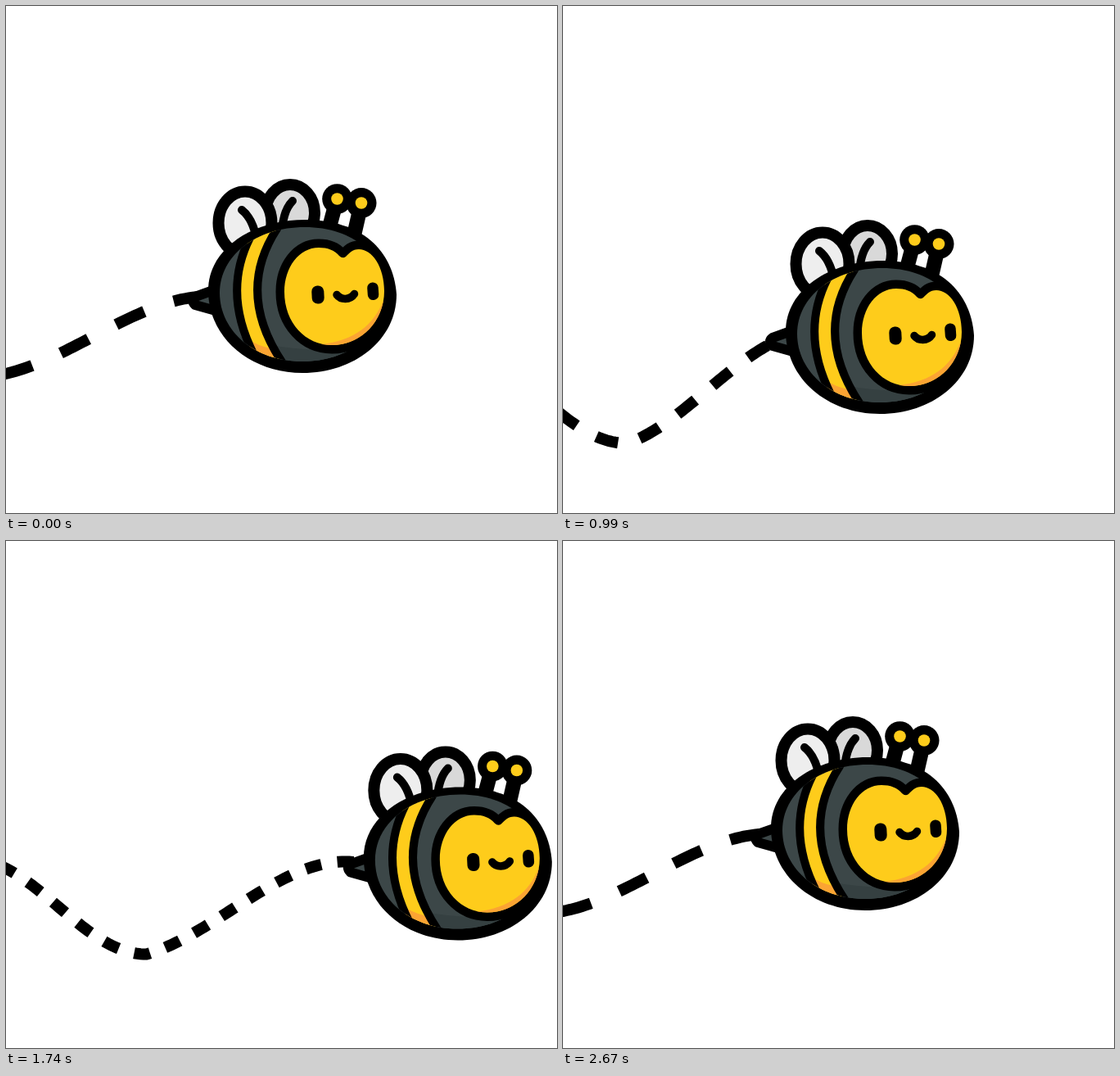
Animation, 673 px wide and 619 px high, one loop 2700 ms. Source, as an HTML page:

```html
<!DOCTYPE html>
<html lang="en">
<head>
<meta charset="utf-8">
<title>Flying bee</title>
<style>
  html, body { margin: 0; width: 100%; height: 100%; overflow: hidden; background: #fff; }
  svg { display: block; width: 100%; height: 100%; }
  .line { fill: none; stroke: #000; stroke-linecap: round; stroke-linejoin: round; }
</style>
</head>
<body>
<svg viewBox="0 0 673 619">
  <defs>
    <path id="belly" d="M261 350 C261 305 305 270 365 270 C425 270 463 305 463 350 C463 400 418 434 362 434 C305 434 261 398 261 350 Z"/>
    <clipPath id="inside"><use href="#belly"/></clipPath>
  </defs>
  <path id="trail" fill="none" stroke="#000" stroke-width="14"/>
  <g id="bee">
    <!-- sting -->
    <path d="M256 346 L231 355 Q225 359 231 365 L256 372 Z" fill="#3c4748" stroke="#000" stroke-width="12" stroke-linejoin="round"/>
    <!-- wings -->
    <g stroke="#000" stroke-width="14">
      <ellipse cx="347" cy="252.5" rx="30" ry="34.5" fill="#d9d9d9"/>
      <path class="line" stroke-width="10" d="M350 238 Q339 249 337 274"/>
      <ellipse cx="292" cy="265" rx="32.5" ry="38.5" fill="#eee"/>
      <path class="line" stroke-width="10" d="M288 249 Q301 259 306 284"/>
    </g>
    <!-- antennae -->
    <path d="M403 240 L395 270 M433 245 L425 280" stroke="#000" stroke-width="18"/>
    <circle cx="404.5" cy="235.5" r="18.3"/>
    <circle cx="434" cy="240.5" r="18.5"/>
    <g fill="#fecc1b">
      <circle cx="404.5" cy="235.5" r="7.3"/>
      <circle cx="434" cy="240.5" r="7.3"/>
    </g>
    <!-- body -->
    <path d="M247 347 C247 297 300 261 365 261 C434 261 473 298 477 352 C477 408 425 448 362 448 C298 448 247 405 247 347 Z"/>
    <use href="#belly" fill="#3c4748"/>
    <g clip-path="url(#inside)">
      <path d="M250 390 Q330 428 430 417 V450 H250 Z" fill="#354041"/>
      <path d="M297 285 Q264 350 302 424 L338 436 Q280 350 331 272 Z" fill="#fecc1b"/>
      <path d="M294 406 Q308 415 323 418 L338 440 L302 428 Z" fill="#fba433"/>
      <path class="line" stroke-width="10" d="M298 283 Q264 350 303 426 M331 272 Q280 350 338 436"/>
    </g>
    <!-- face -->
    <path d="M415 306 Q411 309 407 305 C401 298 393 295 382 295 C358 295 340 319 340 349 C340 387 366 414 398 414 C434 414 462 384 462 348 C462 318 447 297 431 297 C423 297 419 302 415 306 Z"
      fill="#fecc1b" stroke="#000" stroke-width="21" stroke-linejoin="round" paint-order="stroke"/>
    <path d="M385 413 C425 409 450 389 461 359 C456 391 430 414 398 414 Z" fill="#fba433"/>
    <rect x="373.5" y="341.5" width="15" height="22" rx="7" transform="rotate(-3 381 352.5)"/>
    <rect x="441.5" y="337.5" width="13.5" height="21.5" rx="6.5" transform="rotate(-4 448 348)"/>
    <path class="line" stroke-width="9.5" d="M404 352.5 C409 359 420 359.500 425.500 351.500"/>
  </g>
</svg>
<script>
const LOOP = 2700, STEP = 30;
const TAIL = { x: 247, y: 354.5 };
const bee = document.getElementById("bee");
const trail = document.getElementById("trail");

// key points of the flight: time, x, y
const flight = [
  [0, 0, 0], [400, -92, 36], [600, -71, 68], [770, -29, 77], [990, 25, 50], [1470, 141, 9],
  [1720, 190, 36], [2010, 147, 97], [2160, 113, 86], [2250, 92, 72], [2670, 7, 3]
];

// trail: time, x of one dash edge, lowest point seen from the bee, slope after it
const waves = [
  [0, 134.5, -35, 453, 0], [600, 115.5, 46, 464, 0.46], [990, 140, 53, 484, 0.48],
  [1470, 165, -9, 491, -0.2], [2010, 144, -16, 435, 1.6], [2250, 145, 6, 430, 0.87]
];

function hermite(a, b, ma, mb, u) {
  const w = 1 - u;
  return (1 + 2 * u) * w * w * a + u * w * w * ma + u * u * (3 - 2 * u) * b - u * u * w * mb;
}

// smooth periodic interpolation of all columns after the time
function sample(keys, t) {
  const n = keys.length;
  let i = n - 1;
  while (keys[i][0] > t) i--;
  const at = j => keys[(j + n) % n];
  const time = j => at(j)[0] + LOOP * Math.floor(j / n);
  const h = time(i + 1) - time(i), u = (t - time(i)) / h;
  return keys[0].slice(1).map((_, c) => {
    const v = j => at(j)[c + 1];
    const slope = j => (v(j + 1) - v(j - 1)) / (time(j + 1) - time(j - 1)) * h;
    return hermite(v(i), v(i + 1), slope(i), slope(i + 1), u);
  });
}

// cosine hill left of the low point, eased climb to the tail right of it
function trailLine(t, lowX, lowY, rise) {
  const HILL = 58, REACH = 215, N = 60;
  const end = 0.7 * Math.sin(2 * Math.PI * t / LOOP);
  const line = [];
  for (let i = -N; i <= N; i++) {
    const u = i / N;
    line.push(i < 0
      ? [lowX + REACH * u, lowY - HILL * (1 - Math.cos(Math.PI * u))]
      : [lowX + (TAIL.x - lowX) * u, lowY + (TAIL.y - lowY) * hermite(0, 1, rise, end, u)]);
  }
  return line;
}

function lengthAt(line, x) {
  let sum = 0;
  for (let i = 1; i < line.length; i++) {
    const [x0, y0] = line[i - 1], [x1, y1] = line[i];
    const len = Math.hypot(x1 - x0, y1 - y0);
    if (x1 >= x) return sum + len * (x - x0) / (x1 - x0);
    sum += len;
  }
  return sum;
}

function dashLength(t) {
  const TURN = 1760, LONG = 38, SHORT = 19.5;
  const k = t < TURN ? 1 - t / TURN : (t - TURN) / (LOOP - TURN);
  return SHORT + (LONG - SHORT) * k;
}

function draw(t) {
  const [bx, by] = sample(flight, t);
  const [edge, lowX, lowY, rise] = sample(waves, t);
  const line = trailLine(t, lowX, lowY, rise);
  const dash = dashLength(t), move = `translate(${bx} ${by})`;
  bee.setAttribute("transform", move);
  trail.setAttribute("transform", move);
  trail.setAttribute("d", "M" + line.map(p => p.map(v => v.toFixed(2)).join(" ")).join("L"));
  trail.setAttribute("stroke-dasharray", `${dash} ${dash}`);
  trail.setAttribute("stroke-dashoffset", -(lengthAt(line, edge - bx) % (2 * dash)));
}

function tick() {
  draw(Math.floor(performance.now() % LOOP / STEP) * STEP);
  requestAnimationFrame(tick);
}
tick();
</script>
</body>
</html>
```
